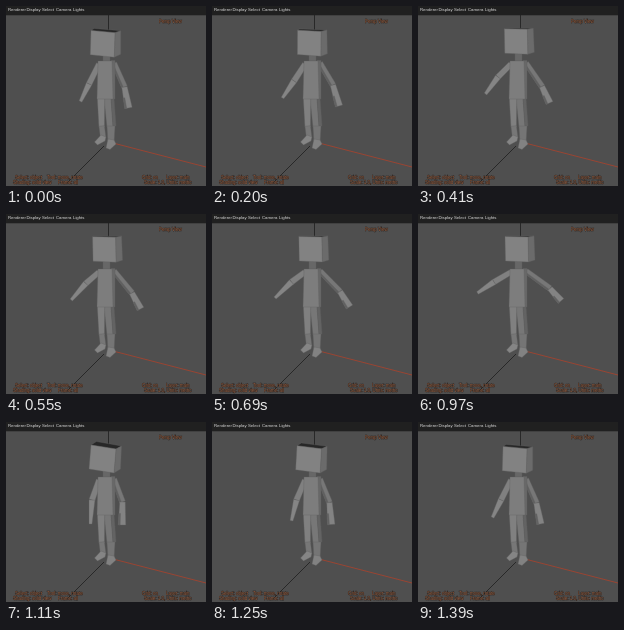
These frames come from a looping animation (200 px wide and 180 px high, 1.46 s). An HTML page:

```html
<!DOCTYPE html>
<html lang="en">
<head>
<meta charset="utf-8">
<style>
html, body { margin: 0; width: 100%; height: 100%; overflow: hidden; background: #4f4f4f; }
svg { display: block; width: 100vw; height: 100vh; }
text { font-family: "Liberation Sans", Arial, sans-serif; }
.menu { font-size: 4.3px; fill: #dedede; }
.info { font-size: 4.5px; fill: #a46a4c; stroke: #211b18; stroke-width: .65px; paint-order: stroke; }
</style>
</head>
<body>
<svg viewBox="0 0 200 180">
  <rect width="200" height="180" fill="#4f4f4f"/>
  <rect width="200" height="9" fill="#202020"/>
  <path d="M0 9.5H200" stroke="#414141"/>
  <g class="menu">
    <text x="2" y="5.4">Renderer</text>
    <text x="20.5" y="5.4">Display</text>
    <text x="36" y="5.4">Select</text>
    <text x="50" y="5.4">Camera</text>
    <text x="67" y="5.4">Lights</text>
  </g>
  <path d="M102.5 9V26M98 140L60 178" stroke="#242424" stroke-width=".9" fill="none"/>
  <path d="M107 137L200 161" stroke="#a2432f" stroke-width=".9"/>
  <g class="info">
    <text x="153" y="16.7">Persp View</text>
    <text x="9" y="173">Select: object</text>
    <text x="41" y="173">Tool: move, rotate</text>
    <text x="7" y="178">Shading: solid view</text>
    <text x="52" y="178">Frame: all</text>
    <text x="136" y="173">Grid: on</text>
    <text x="160" y="173">Layer: main</text>
    <text x="138" y="178">Scale: 1.0, Units: metric</text>
  </g>
  <g id="body" stroke="#606060" stroke-width=".35" stroke-linejoin="round"></g>
</svg>
<script>
const LOOP = 1460, STEP = 70;
const root = document.getElementById('body');

function part(fill, points) {
  const p = document.createElementNS('http://www.w3.org/2000/svg', 'polygon');
  p.setAttribute('fill', fill);
  root.append(p);
  const draw = pts => p.setAttribute('points', pts.flat().join(' '));
  if (points) draw(points);
  return draw;
}
const mix = (a, b, u) => a + (b - a) * u;
const between = (p, q, u) => p.map((v, i) => mix(v, q[i], u));

// tapered segment: start width wa, end width wb
function limb(ax, ay, bx, by, wa, wb) {
  const d = Math.hypot(bx - ax, by - ay) * 2;
  const nx = (by - ay) / d, ny = (ax - bx) / d;
  return [[ax + nx * wa, ay + ny * wa], [bx + nx * wb, by + ny * wb],
          [bx - nx * wb, by - ny * wb], [ax - nx * wa, ay - ny * wa]];
}
// shaded strip along the outer edge of a limb
const strip = (q, u) => [q[3], q[2], between(q[2], q[1], u), between(q[3], q[0], u)];

part('#676767', limb(100.5, 46, 100.5, 55, 7, 7));
part('#777777', limb(101.5, 92, 104, 121, 7, 6));
part('#636363', limb(106.5, 92, 108.5, 120, 3, 3));
part('#757575', limb(105, 120, 105, 137, 8, 6));
part('#828282', [102,133, 108,134, 110,138, 104,143.5, 100,142]);
part('#808080', limb(95, 91, 95.7, 121, 7.5, 5.5));
part('#777777', limb(95.7, 120, 97.2, 132, 5.5, 5.5));
part('#858585', [95,129, 100,131, 99,135, 91.5,139, 88.5,136]);
const upperL = part('#808080'), foreL = part('#858585');
const upperR = part('#777777'), upperSide = part('#606060');
const foreR = part('#838383'), handSide = part('#626262');
part('#686868', limb(107, 54.5, 107, 93, 4, 4));
part('#7d7d7d', limb(99, 55, 99, 93, 14, 16));
const crown = part('#272727'), headSide = part('#6b6b6b'), head = part('#828282');

// step; left elbow, left hand; right elbow, right hand; head nod, shift x, shift y
const keys = [
  [0,  83,78, 74.5,95.5, 118.5,81, 122.5,102, .5,-1,1.7],
  [3,  82,75, 70.5,92, 121,79, 127,100, .25,-1,1.5],
  [6,  80,71, 67.5,88, 124,80.5, 131.5,97, 0,-.7,.3],
  [10, 79.5,68, 63,84, 128,77.5, 137.5,93, 0,-.2,0],
  [14, 76,68, 59.5,79, 132,74.5, 143,87, 0,0,0],
  [16, 86,78, 84.5,102, 116.5,80, 116,103, 1,0,0]
];
const last = [20, ...keys[0].slice(1)];
keys.push(last, [21, ...last.slice(1)]);

function poseAt(n) {
  const i = keys.findIndex(k => k[0] > n);
  const a = keys[i - 1], b = keys[i];
  return between(a, b, (n - a[0]) / (b[0] - a[0])).slice(1);
}

function drawHead(nod, dx, dy) {
  const at = (x, y, nx, ny) => [x + dx + nod * nx, y + dy + nod * ny];
  const tl = at(87, 22.5, -2, .5), tr = at(110, 23, 0, 4);
  const br = at(110.5, 48, -2.5, 3), bl = at(87.5, 47, -4.5, 0);
  const backL = at(88, 22, 2.5, -2.5), backR = at(116, 22, -.5, 2);
  const low = at(117, 46, -2.5, 1);
  crown([tl, backL, backR, tr]);
  headSide([tr, backR, low, br]);
  head([tl, tr, br, bl]);
}

function render(ms) {
  const t = ms % LOOP;
  const n = Math.floor((t < 200 ? t : t + 10) / STEP);
  const [lx, ly, hx, hy, rx, ry, qx, qy, ...nod] = poseAt(n);

  upperL(limb(93, 58, lx, ly, 5.5, 6));
  foreL(limb(lx, ly, hx, hy, 6, 3));

  const up = limb(108, 57, rx, ry, 5.5, 6);
  upperR(up);
  upperSide(strip(up, .3));
  foreR(limb(rx, ry, qx, qy, 5.5, 7.5));
  handSide(strip(limb(mix(rx, qx, .5), mix(ry, qy, .5), qx, qy, 7, 7.5), .25));

  drawHead(...nod);
}

const start = performance.now();
function tick(now) {
  render(Math.max(0, now - start));
  requestAnimationFrame(tick);
}
render(0);
requestAnimationFrame(tick);
</script>
</body>
</html>
```
